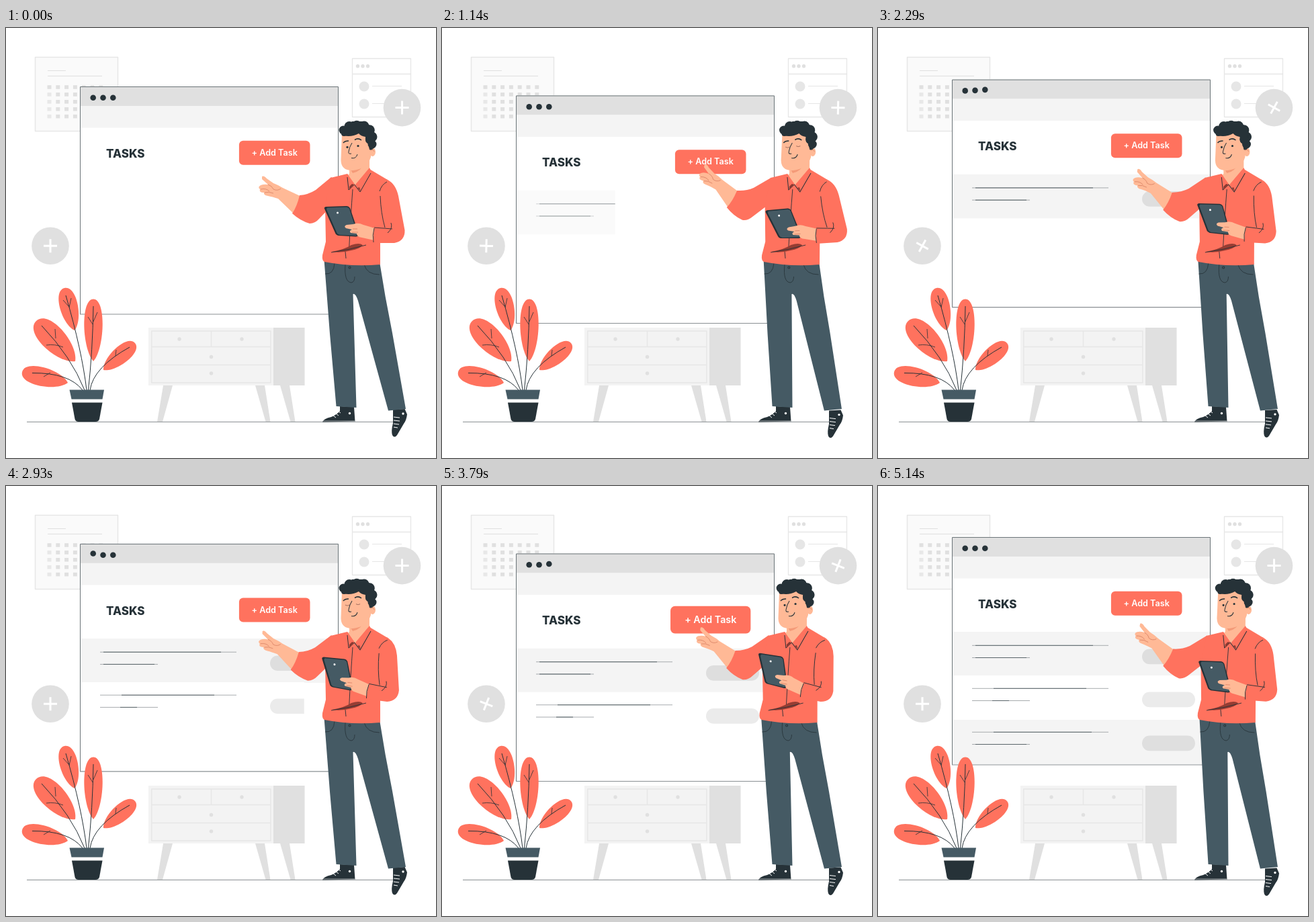
An HTML page with a canvas that plays this animation: 640x640 px, repeating every 5.21 s.

```html
<!DOCTYPE html>
<html lang="en">
<head>
<meta charset="utf-8">
<title>Tasks</title>
<style>
  html, body { margin: 0; width: 100%; height: 100%; overflow: hidden; background: #fff; }
  canvas { display: block; }
</style>
</head>
<body>
<canvas id="stage" width="640" height="640"></canvas>
<script>
const ctx = document.getElementById('stage').getContext('2d');
const LOOP = 5210, STEP = LOOP / 73, BEAT = LOOP / 3;
const CORAL = '#ff725e', DARK = '#263238', SLATE = '#455a64', SKIN = '#ffb996';
const GREY = '#e0e0e0', PALE = '#f4f4f4', RULE = '#e6e6e6';

// Smooth curve through [time, value] pairs
function track(...keys) {
  const slope = i => {
    const a = keys[Math.max(i - 1, 0)], b = keys[Math.min(i + 1, keys.length - 1)];
    return (b[1] - a[1]) / (b[0] - a[0]);
  };
  return t => {
    let i = 0;
    while (i < keys.length - 2 && t > keys[i + 1][0]) i++;
    const [t0, a] = keys[i], [t1, b] = keys[i + 1], d = t1 - t0, u = (t - t0) / d;
    const u2 = u * u, u3 = u2 * u;
    return (2 * u3 - 3 * u2 + 1) * a + (u3 - 2 * u2 + u) * d * slope(i)
         + (3 * u2 - 2 * u3) * b + (u3 - u2) * d * slope(i + 1);
  };
}

const boardTop = track([0, 87], [570, 96.3], [1000, 100.4], [1140, 100.5], [1710, 88.3], [2290, 76.5],
  [2430, 75.5], [2860, 83.7], [2930, 86], [3430, 97], [3790, 100.5], [4000, 97.5], [4570, 83.5], [5140, 76], [5210, 75.6]);
const leanAmount = track([0, 0], [1140, 1], [2290, .55], [2930, 0], [3790, .33], [4570, .72], [5210, 1]);
const pointAmount = track([0, 0], [1140, 1], [2290, .6], [2930, .28], [3790, .58], [4570, .8], [5210, .93]);
const tabletAngle = track([0, 0], [850, -4], [1140, -3.5], [2290, 3.3], [2930, 7.3], [3790, 10.8], [4570, 7.2], [5210, 3.4]);

// A single bump from 0 to 1 and back between two times
const bump = (t, a, b) => t > a && t < b ? Math.sin((t - a) / (b - a) * Math.PI) : 0;
const clamp = v => Math.min(1, Math.max(0, v));

function fill(d, color) { ctx.fillStyle = color; ctx.fill(new Path2D(d)); }
function line(d, color = DARK, width = 1) {
  ctx.strokeStyle = color; ctx.lineWidth = width; ctx.stroke(new Path2D(d));
}
function box(x, y, w, h, color) { ctx.fillStyle = color; ctx.fillRect(x, y, w, h); }
function frame(x, y, w, h, color, width) {
  ctx.strokeStyle = color; ctx.lineWidth = width; ctx.strokeRect(x, y, w, h);
}
function rounded(x, y, w, h, r, color) {
  ctx.fillStyle = color; ctx.beginPath(); ctx.roundRect(x, y, w, h, r); ctx.fill();
}
function oval(x, y, rx, ry, color) {
  ctx.fillStyle = color; ctx.beginPath(); ctx.ellipse(x, y, rx, ry, 0, 0, 7); ctx.fill();
}
const dot = (x, y, r, color) => oval(x, y, r, r, color);
function group(draw) { ctx.save(); draw(); ctx.restore(); }
function spin(x, y, deg) {
  ctx.translate(x, y); ctx.rotate(deg * Math.PI / 180); ctx.translate(-x, -y);
}

function calendar() {
  box(43, 43, 124, 111, '#fafafa');
  frame(43.5, 43.5, 123, 110, RULE, 1.5);
  line('M62 63.5H89M62 71.5H143', GREY);
  for (let r = 0; r < 5; r++)
    for (let c = 0; c < 7; c++) box(61.5 + c * 12.8, 85.2 + r * 10.9, 6, 5.6, r && c === 0 ? '#e8e8e8' : GREY);
}

function miniWindow() {
  frame(515.5, 45.5, 87, 87, RULE, 1.3);
  line('M515 68.5H602', RULE, 1.3);
  for (let i = 0; i < 3; i++) dot(523.5 + i * 7.5, 56.7, 2.7, GREY);
  for (const y of [87, 113]) {
    dot(533, y, 7.5, RULE);
    line(`M545 ${y - .5}H${y < 100 ? 589 : 575}`, RULE);
  }
}

function plus(x, y, deg) {
  dot(x, y, 27.8, GREY);
  group(() => {
    spin(x, y, deg);
    line(`M${x - 10} ${y}h20M${x} ${y - 10}v20`, '#fff', 3);
  });
}

function cabinet() {
  box(212, 446, 187, 86, '#f3f3f3');
  box(398, 446, 46.5, 86, GREY);
  frame(216.8, 451, 177, 77, RULE, 1.5);
  line('M217 474.5H393M217 501.5H393M305.5 451V474', RULE, 1.5);
  for (const [x, y] of [[258, 463], [351, 463], [305.5, 489.5], [305.5, 514]]) dot(x, y, 2.7, GREY);
  fill('M234 532h14l-15 54h-8ZM371 532h14l8.5 54h-7ZM408 532h14l8.5 54h-7Z', GREY);
}

// Leaf that is narrow at its base and blunt at its tip
function leaf(x, y, tipX, tipY, half) {
  const length = Math.hypot(tipX - x, tipY - y);
  group(() => {
    ctx.translate(x, y);
    ctx.rotate(Math.atan2(tipY - y, tipX - x));
    ctx.fillStyle = CORAL;
    ctx.beginPath();
    ctx.moveTo(0, 0);
    ctx.bezierCurveTo(length * .2, half * 1.25, length, half * 1.45, length, 0);
    ctx.bezierCurveTo(length, -half * 1.45, length * .2, -half * 1.25, 0, 0);
    ctx.fill();
  });
}

function plant() {
  leaf(102, 450, 87, 387, 13.3);
  leaf(130, 496, 130, 403.5, 13.5);
  leaf(103, 496, 45, 436, 18);
  leaf(92, 528, 24, 512, 13.8);
  leaf(145, 509, 192, 469, 12.5);
  line('M120 539Q113 480 89 398M122.500 539Q129 480 130 414M117 539Q97 489 53 443'
     + 'M114 539Q94 513 39 513.500M125 539Q130 505 184 475');
  line('M93 414l-8 -9M94 416l3 -14M129 441l-7 -11M130 437l6 -14'
     + 'M85 475Q73 470 60 472M74 462l-1 -14M66 513l-10 6M163 488l1 -9', DARK, .8);
  fill('M94.500 538.500H146L143.500 552.500H97.500Z', SLATE);
  fill('M98 557.500H143.500L139 582Q138 586 133 586H108Q103.500 586 102.500 582Z', DARK);
}

// Task line: a fine rule with a darker middle
function rule(y, end, from, to) {
  line(`M140 ${y}H${end}`, '#9da2a5', .9);
  line(`M${from} ${y}H${to}`, '#5b666b', 1);
}

const rows = [
  { start: 965, y: 141, inset: 0, shade: PALE, pill: '#dedede', heavy: [145, 320, 145, 221] },
  { start: 2525, y: 206, inset: -1, shade: '#fff', pill: '#ebebeb', heavy: [172, 310, 170, 195] },
  { start: 4000, y: 272, inset: -2, shade: PALE, pill: '#dfdfdf', heavy: [172, 318, 145, 221] }
];

function taskRow(row, t) {
  const shown = clamp((t - row.start) / 463);
  if (!shown) return;
  group(() => {
    ctx.beginPath(); ctx.rect(111, row.y, 384 * shown, 66); ctx.clip();
    ctx.globalAlpha = clamp(shown * 1.3);
    box(111, row.y, 384, 66, row.shade);
    const [a, b, c, d] = row.heavy, top = row.y + row.inset;
    rule(top + 20.3, 343, a, b);
    rule(top + 38.5, 226, c, d);
    rounded(393, top + 25.5, 79, 22.7, 11.3, row.pill);
  });
}

function board(t) {
  group(() => {
    ctx.translate(0, boardTop(t));
    box(111, 0, 384, 339, '#fff');
    box(111, 0, 384, 29, GREY);
    box(111, 29, 384, 32.5, PALE);
    const p = t % (LOOP / 10);
    for (let i = 0; i < 3; i++) {
      const start = 270 - i * 80;
      dot(129.7 + i * 14.8, 16.8 - 2.2 * bump(p, start, start + 120), 4.3, DARK);
    }
    rows.forEach(row => taskRow(row, t));
    ctx.textBaseline = 'alphabetic';
    ctx.fillStyle = DARK;
    ctx.textAlign = 'left';
    ctx.font = '800 17px Inter, sans-serif';
    ctx.fillText('TASKS', 149, 105.8);
    group(() => {
      const scale = 1 + .13 * bump(t % BEAT, 100, 520);
      ctx.translate(399.7, 98.7); ctx.scale(scale, scale);
      rounded(-52.8, -18, 105.6, 36, 6, CORAL);
      ctx.fillStyle = '#fff';
      ctx.textAlign = 'center';
      ctx.font = '600 12.6px Inter, sans-serif';
      ctx.fillText('+ Add Task', 0, 4);
    });
    line('M110.500 339V.5H494.500V339', '#6b7478', 1);
    line('M110 339H495', '#8a9093', 1.1);
  });
}

function shoes(lean) {
  fill('M497 563L518 564L519.500 585.500L471 586.500Q473 581 484 579Q493 575 497 570Z', DARK);
  line('M486 576l5 4M490 573l5 4M494 570l4 3', '#fff', 1);
  dot(511.5, 573.5, 1.7, '#fff');
  line('M472 585H519', '#fff', .6);
  group(() => {
    ctx.translate(0, lean * 1.6);
    fill('M576 568L593.500 567L597 575Q596 584 592 589L582 606Q578 611 575 606Q573 600 576 588Z', DARK);
    line('M577 584l9 1M577 589l8 1M577 579l9 1M577 594l6 1', '#fff', 1);
    dot(591, 574, 1.7, '#fff');
  });
}

function legs(lean) {
  group(() => {
    ctx.transform(1, 0, -.02326 * lean, 1, 13.14 * lean, 0);
    fill('M473.500 345H555.500Q564 400 575 454L595 567L569 569.500L524 406Q520 394 516.500 396L521.500 565L491.500 563L482 455Z', SLATE);
    line('M475 366Q488 367 489 350M533 352Q537 367 556 367M505 352Q503 378 514 379Q519 378 519 370', DARK, .8);
    dot(511.5, 356.5, 2, DARK);
    dot(511.5, 356.5, 1, SLATE);
  });
}

function head(t) {
  const blink = bump(t % BEAT, 1040, 1250) > .1;
  fill('M511 203L541 190V212Q533 226 521 234Q513 227 511 221Z', SKIN);
  fill('M513 211Q524 210 531 203Q529 213 516 216Z', '#f49a78');
  fill('M500 156H543V192Q538 209 517 212Q499 213 498.500 197Z', SKIN);
  oval(545.5, 184.5, 4.5, 6.5, SKIN);
  for (const [x, y, r] of [[502, 152, 6.5], [511, 146.5, 7.5], [522, 145, 7.3], [533, 146, 7.5],
    [541, 152, 7.8], [545, 162, 7.5], [545, 173, 6.5], [542, 166, 7], [503, 157, 4]]) dot(x, y, r, DARK);
  fill('M502 151L515 139H533L547 149L547 178Q545 183 541 181L539 172Q534 170 535 162Q528 161 525 157Q514 163 502 160Z', DARK);
  line('M502 171Q504 168 510 168M519 166.500Q524 163 529 167', DARK, 1.6);
  line('M515 171Q511 177 510 184Q509 188 514 187M514 193.500Q521 195 523 188', DARK, 1);
  if (blink) line('M505 177q3 2 6 0M521 175.500q3 2 6 0', '#a97563', 1);
  else { dot(508, 177.3, 1.6, DARK); dot(524, 175.5, 1.6, DARK); }
  line('M543 182q4 -2 5 2', '#d98265', .8);
}

function torso() {
  fill('M483 223L508 217L520 232L541 210L568 226Q577 250 568 300L557 318V352Q515 356 474 348Q470 346 471 338L476 318L475 265Z', CORAL);
  fill('M509 219L520 234L541 210L539 206L522 227L511 217Z', SKIN);
  fill('M508 217L509 240L519 233ZM541 208L545 216L528 243L520 233Z', CORAL);
  line('M508 222L510 241L518.500 233L527 244L543 216', DARK, 1);
  fill('M511 236l4 -4l3 1l-7 8ZM523 238l3 -1l2 6Z', '#8c3a32');
  line('M516 240Q513 280 510.500 331M505 333L506 343', DARK, .9);
  fill('M485 333Q503 330 514 323Q526 319 531 323Q526 329 514 331Q500 335 485 333Z', '#963d33');
  line('M484 334Q512 330 536 323', DARK, .9);
}

function pointingArm(amount) {
  group(() => {
    spin(480, 222, 9 * amount);
    group(() => {
      spin(440, 265, 2.5 * amount);
      fill('M381 221Q384 219 388 224L398 231Q406 234 412 238L442 252L432 280L405 254Q396 251 390 250Q383 249 384 245'
         + 'Q376 245 378 240Q374 237 379 234Q384 232 390 233L381 225Z', SKIN);
      line('M390 233Q396 235 398 240Q404 243 409 239M379 240Q387 238 392 243M385 245Q391 243 398 246', '#d98265', .8);
    });
    fill('M484 222L461 241Q450 248 437 249Q433 266 426 276Q438 287 452 291Q460 291 466 284L487 262L505 238Z', CORAL);
  });
}

function tabletArm(deg) {
  group(() => {
    spin(565, 235, deg);
    fill('M476 266L507 265Q510 265 512 268L525 306Q525 310 521 310.500L495 309Q491 308 490 305L474 269Q473 267 476 266Z', DARK);
    fill('M478 267.500L507 266.500Q510 267 511 269L523 306Q523 309 520 309L497 308Q493 307 492 304L477 270Z', SLATE);
    dot(493.5, 275, 1.5, '#fff');
    fill('M549 298L532 293Q524 289 517 292L507 293Q502 295 506 298L515 300Q510 302 513 305L522 306Q522 311 530 312L548 316Z', SKIN);
    line('M516 299L523 299M515 304L524 304', '#d98265', .8);
    fill('M555 230Q562 223 568 226Q580 232 584 250L593.500 301Q594 317 578 320H547Q546 308 548 297L565 298L559 268Z', CORAL);
    line('M557 250Q558 276 564 297M548 297L575 299M568 305Q576 298 573 290M548 298Q545 308 547 319', DARK, .9);
    line('M556 243Q559 233 567 229', DARK, .9);
  });
}

function man(t) {
  const lean = leanAmount(t);
  shoes(lean);
  legs(lean);
  group(() => {
    ctx.transform(1, 0, -.0075 * lean, 1, 7.625 * lean, 0);
    pointingArm(pointAmount(t));
    head(t);
    torso();
    tabletArm(tabletAngle(t));
  });
}

function draw(t) {
  box(0, 0, 640, 640, '#fff');
  const tilt = 29 * bump(t % BEAT, 0, 1158);
  calendar();
  miniWindow();
  plus(66, 324.3, tilt);
  plus(589.5, 118.6, tilt);
  cabinet();
  line('M31 586.300H577', '#858b8e', 1);
  board(t);
  plant();
  man(t);
}

ctx.lineJoin = 'round';
const begin = performance.now();
function tick() {
  const t = (performance.now() - begin) % LOOP;
  draw(Math.min(72, Math.floor((t + 7) / STEP)) * STEP);
  requestAnimationFrame(tick);
}
tick();
</script>
</body>
</html>
```
